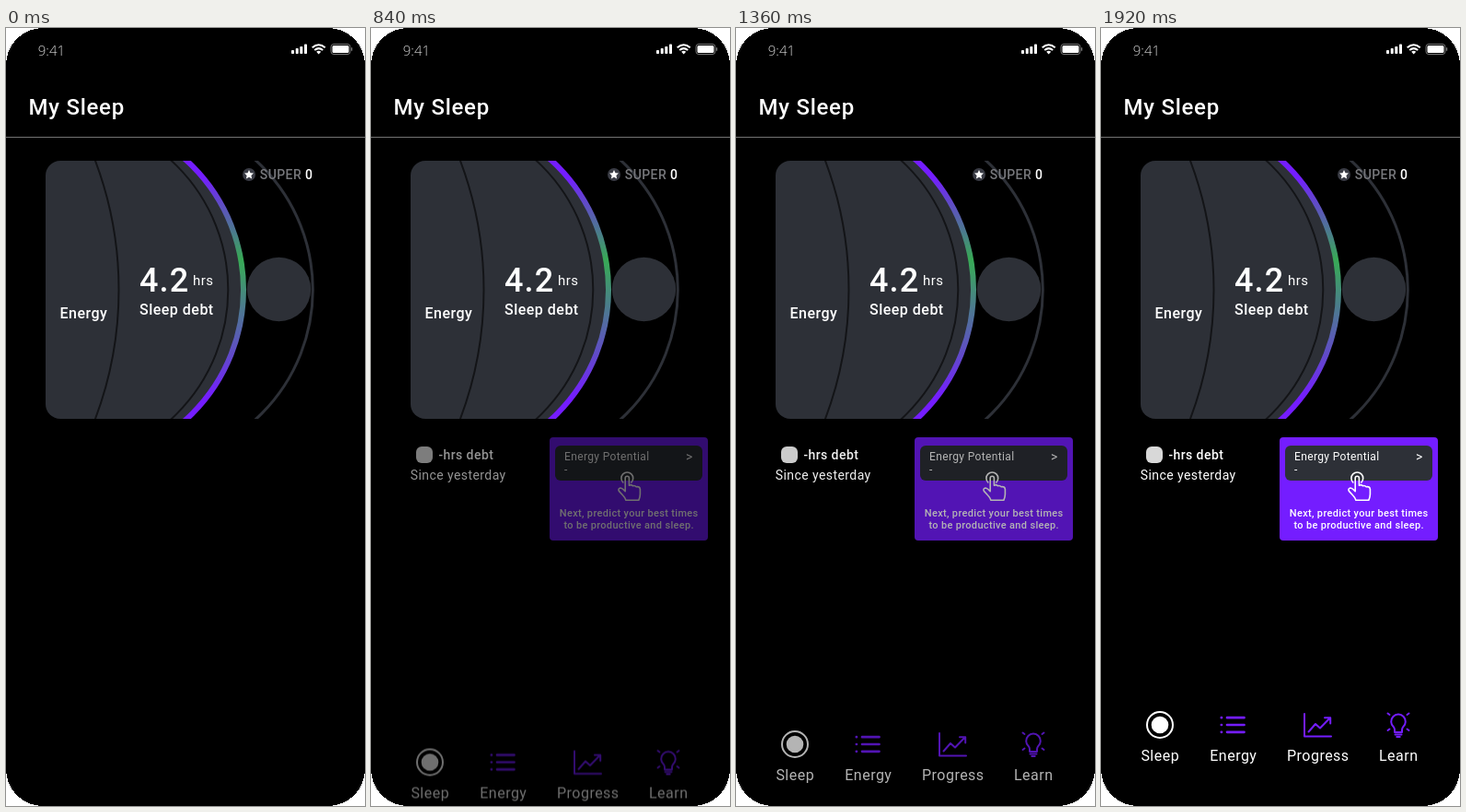
An HTML page for the animation above (1.96 s loop, 390x844 px).

```html
<!DOCTYPE html>
<html lang="en">
<head>
<meta charset="utf-8">
<title>My Sleep</title>
<style>
  html, body { margin: 0; width: 100%; height: 100%; overflow: hidden; background: #fff; }
  svg { display: block; width: 390px; height: 844px; }
  text { font-family: Roboto, sans-serif; font-size: 16px; letter-spacing: .03em; fill: #fff; }
  .medium { font-weight: 500; }
  .small { font-size: 14px; }
  .tiny { font-size: 12px; }
  .unit { font-size: 15px; }
  .hint { font-size: 11px; font-weight: 500; text-anchor: middle; }
  .clock { font: 300 15px "Open Sans", sans-serif; letter-spacing: 0; fill: #ddd; }
  .title { font-size: 24px; font-weight: 500; }
  .value { font-size: 36px; font-weight: 500; }
  .line { fill: none; stroke: #fff; stroke-width: 1.6; stroke-linecap: round; stroke-linejoin: round; }
  .purple { stroke: #741dff; stroke-width: 2; }

  /* 49 poses, 40 ms each */
  .card, .nav { animation: fade 1960ms steps(49, jump-none) infinite; }
  .nav { animation-name: rise; }
  .debt { animation: appear 1960ms steps(36, end) infinite; }
  @keyframes fade { from { opacity: 0; } to { opacity: 1; } }
  @keyframes rise {
    from { opacity: 0; transform: translateY(72px); }
    to { opacity: 1; transform: none; }
  }
  @keyframes appear {
    from { opacity: 0; }
    73.4694%, to { opacity: 1; }
  }
</style>
</head>
<body>
<svg viewBox="0 0 390 844">
  <defs>
    <clipPath id="panel"><rect x="43" y="144" width="300" height="280" rx="16"/></clipPath>
    <linearGradient id="glow" gradientUnits="userSpaceOnUse" x1="0" y1="144" x2="0" y2="424">
      <stop offset=".06" stop-color="#741dff"/>
      <stop offset=".38" stop-color="#38a856"/>
      <stop offset=".42" stop-color="#3ba35f"/>
      <stop offset=".92" stop-color="#741dff"/>
    </linearGradient>
  </defs>

  <rect width="390" height="844" rx="40" shape-rendering="crispEdges"/>

  <!-- status bar -->
  <text class="clock" x="34.8" y="30">9:41</text>
  <g fill="#fff">
    <rect x="310" y="24" width="3" height="4" rx=".8"/>
    <rect x="314.7" y="22" width="3" height="6" rx=".8"/>
    <rect x="319.3" y="20" width="3" height="8" rx=".8"/>
    <rect x="324" y="17.5" width="3" height="10.5" rx=".8"/>
    <path d="M337.2 25.7Q339.7 23.7 342.2 25.7L339.7 28.4Z"/>
    <rect x="354.5" y="19" width="18" height="8" rx="1.5"/>
  </g>
  <g fill="none" stroke="#fff" stroke-width="2">
    <path d="M332.7 21.2Q339.7 15.2 346.7 21.2M335.2 24Q339.7 20.2 344.2 24"/>
    <rect x="353" y="17.5" width="21" height="11" rx="3" stroke-width="1" stroke="#777"/>
    <path d="M375.6 21.3V24.7" stroke="#777" stroke-width="1.3"/>
  </g>

  <text class="title" x="24.6" y="94">My Sleep</text>
  <path d="M0 118.5H390" stroke="#737373"/>

  <!-- dial -->
  <g clip-path="url(#panel)" fill="none">
    <circle cx="68" cy="284" r="190" fill="#2d3037"/>
    <circle cx="-274.5" cy="284" r="397" stroke="#131417" stroke-width="2"/>
    <circle cx="51.3" cy="284" r="190" stroke="#131417" stroke-width="2"/>
    <circle cx="68" cy="284" r="190" stroke="url(#glow)" stroke-width="6"/>
    <circle cx="143.3" cy="284" r="190" stroke="#2d3037" stroke-width="3"/>
  </g>
  <circle cx="296.5" cy="283.5" r="34.7" fill="#2d3037"/>
  <text class="medium" x="58.5" y="315">Energy</text>
  <text class="value" x="145" y="286">4.2</text>
  <text class="unit" x="203" y="279">hrs</text>
  <text class="medium" x="145" y="311">Sleep debt</text>

  <circle cx="264" cy="159" r="7" fill="#393b44"/>
  <path fill="#fff" d="M264 154l1.5 3.2 3.5.4-2.6 2.4.7 3.4-3.1-1.7-3.1 1.7.7-3.4-2.6-2.4 3.5-.4z"/>
  <text class="small medium" x="275.8" y="164" style="fill:#77787c">SUPER</text>
  <text class="small medium" x="325" y="164">0</text>

  <g class="debt">
    <rect x="49" y="454" width="18" height="18" rx="6" fill="#d8d8d8"/>
    <text class="small medium" x="73.5" y="468">-hrs debt</text>
    <text class="small" x="42.8" y="490">Since yesterday</text>
  </g>

  <g class="card">
    <rect x="194" y="444" width="172" height="112" rx="4" fill="#741dff"/>
    <rect x="200" y="453" width="160" height="38" rx="6" fill="#2d3037"/>
    <text class="tiny" x="210" y="469">Energy Potential</text>
    <text class="tiny" x="210" y="483">-</text>
    <text class="small" x="342" y="470">&gt;</text>
    <g class="line" transform="translate(.4 .8)">
      <path d="M273.4 492.2A6.4 6.4 0 1 1 282.4 492.2"/>
      <path d="M275.8 501V487.5a2.1 2.1 0 0 1 4.2 0V495.5q2-1.6 4 .5q2-1 3.8 1q3.7-.8 4.2 2.5V505q0 3-1.6 6.5H276.5q-1-3-3.5-5.5l-4-4.4q-1.4-2.6 1.4-3.4q2 0 5.4 3.6"/>
    </g>
    <text class="hint" x="280.2" y="530">Next, predict your best times</text>
    <text class="hint" x="280.2" y="543">to be productive and sleep.</text>
  </g>

  <g class="nav">
    <circle cx="64" cy="756" r="14" fill="none" stroke="#fff" stroke-width="2"/>
    <circle cx="64" cy="756" r="9.3" fill="#fff"/>
    <path class="line purple" style="stroke-width:2.7" d="M130.8 748.2h.2M130.8 756h.2M130.8 763.8h.2M137 748.2H155.5M137 756H155.5M137 763.8H155.5"/>
    <path class="line purple" d="M221 744V768.5H250M225.5 763.5L233 755L238 759.5L249 748.3M243 748.3H249.2V754.5"/>
    <path class="line purple" d="M319 764V761.5Q319 759.8 317.8 758.2A7.8 7.8 0 1 1 328.2 758.2Q327 759.8 327 761.5V764ZM319.5 766.5H326.5M321.3 769H324.7M311.5 743.5l2 1.5M334.5 743.5l-2 1.5M311.5 762l2-1.5M334.5 762l-2-1.5"/>
    <text x="43.4" y="795">Sleep</text>
    <text x="118.3" y="795">Energy</text>
    <text x="202" y="795">Progress</text>
    <text x="302" y="795">Learn</text>
  </g>
</svg>
</body>
</html>
```
